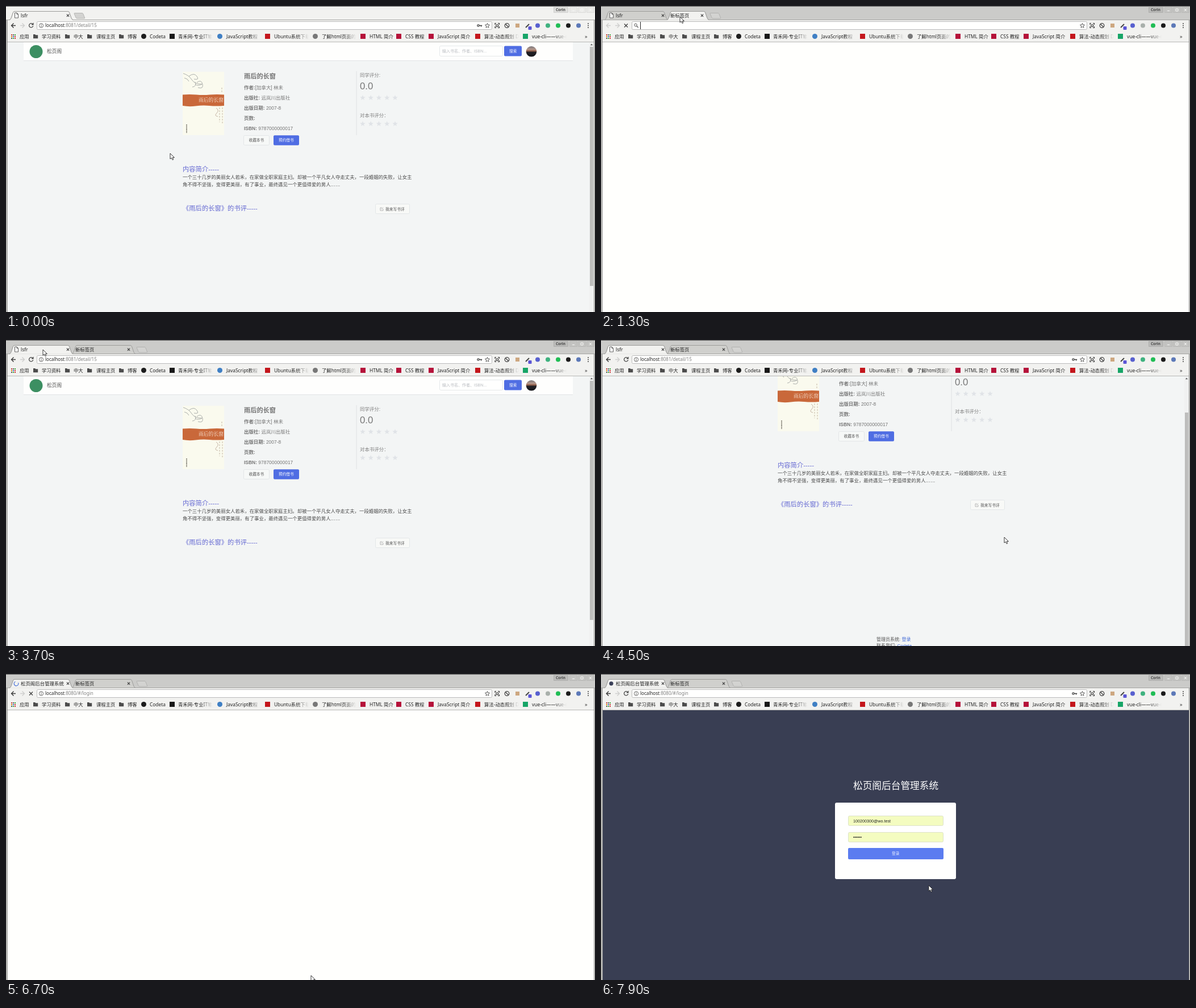
Recreate the animation shown at these times as an HTML page. Size 1037x540 px, loop 8000 ms.

```html
<!DOCTYPE html>
<html lang="zh-CN">
<head>
<meta charset="utf-8">
<title>Library demo</title>
<style>
html, body { margin: 0; width: 100%; height: 100%; overflow: hidden; background: #f2f2f0; }
svg { display: block; width: 1037px; height: 540px; }
text { font-family: 'Noto Sans', 'Noto Sans CJK SC', 'Noto Sans CJK', sans-serif; white-space: pre; }
.page text { font-family: 'Liberation Sans', 'Noto Sans CJK SC', 'Noto Sans CJK', sans-serif; }
.page .serif { font-family: 'Noto Serif', 'Noto Serif CJK SC', 'Noto Sans CJK SC', serif; }
.line { fill: none; stroke: #3c3c3c; stroke-width: 1.2; }
</style>
</head>
<body>
<svg id="stage" viewBox="0 0 1037 540" xmlns="http://www.w3.org/2000/svg"></svg>
<script>
const BAR = '#f2f2f0';
const BLUE = '#4f6de3';

const text = (x, y, s, size = 8.4, fill = '#222', extra = '') =>
  `<text x="${x}" y="${y}" font-size="${size}" fill="${fill}" ${extra}>${s}</text>`;
const rect = (x, y, w, h, fill, extra = '') =>
  `<rect x="${x}" y="${y}" width="${w}" height="${h}" fill="${fill}" ${extra}/>`;
const disc = (x, y, r, fill, extra = '') =>
  `<circle cx="${x}" cy="${y}" r="${r}" fill="${fill}" ${extra}/>`;
const path = (d, extra = 'class="line"') => `<path d="${d}" ${extra}/>`;
const group = (id, body, extra = '') => `<g id="${id}" ${extra}>${body}</g>`;
const box = (x, y, w, h, fill, edge) =>
  rect(x + .5, y + .5, w - 1, h - 1, fill, `rx="2" stroke="${edge}" stroke-width=".8"`);

const tabShape = (left, right) =>
  `M${left} 24.5Q${left + 2} 24 ${left + 3} 21.5L${left + 6.5} 11.5Q${left + 7.3} 9.5 ${left + 9} 9.5` +
  `H${right - 9}Q${right - 7.3} 9.5 ${right - 6.5} 11.5L${right - 3} 21.5Q${right - 2} 24 ${right} 24.5`;
const cross = (x, y, r) => `M${x - r} ${y - r}l${2 * r} ${2 * r}m0 ${-2 * r}l${-2 * r} ${2 * r}`;

function star(cx, cy, r, inner = .42) {
  let pts = '';
  for (let i = 0; i < 10; i++) {
    const a = i * Math.PI / 5, k = i % 2 ? r * inner : r;
    pts += `${(cx + k * Math.sin(a)).toFixed(2)},${(cy - k * Math.cos(a)).toFixed(2)} `;
  }
  return pts;
}
const starRow = y => [0, 1, 2, 3, 4].map(i =>
  `<polygon points="${star(628 + i * 14.25, y, 5)}" fill="#e0e3e7"/>`).join('');

// Bookmark: kind of icon, icon left edge, label left edge, label, optional fade end
const folder = x => path(`M${x} 50h3.2l1 1.2h4v6h-8.2z`, 'fill="#4c4c4c"');
const square = fill => x => rect(x, 49, 9, 9, fill);
const round = fill => x => disc(x + 4.5, 53.5, 4.5, fill);
const bookmarks = [
  [folder, 48, 63, '学习资料'], [folder, 104, 119, '中大'],
  [folder, 143, 159, '课程主页'], [folder, 199, 214, '博客'],
  [round('#1c1c1c'), 238, 253, 'Codeta'],
  [square('#181818'), 288, 303, '青禾网-专业IT笔', 364],
  [round('#3f7fc4'), 372, 388, 'JavaScript教程', 449],
  [square('#c4161c'), 456, 472, 'Ubuntu系统下载', 533],
  [round('#777'), 540, 556, '了解html页面的', 617],
  [square('#b5123a'), 624, 640, 'HTML 简介'],
  [square('#b5123a'), 687, 703, 'CSS 教程'],
  [square('#b5123a'), 744, 760, 'JavaScript 简介'],
  [square('#c4161c'), 826, 842, '算法-动态规划 D', 903],
  [square('#17a567'), 910, 926, 'vue-cli——vue-r', 987]
];
const bookmark = ([icon, ix, tx, label, end]) =>
  icon(ix) + text(tx, 56.7, label) +
  (end ? rect(end - 22, 47, 22, 14, 'url(#fade)') + rect(end, 47, 7, 14, BAR) : '');

function appsGrid() {
  const tones = ['#c33', '#555', '#3a3', '#d80', '#36c', '#c33', '#555', '#3a3', '#c33'];
  return tones.map((c, i) => rect(9 + i % 3 * 3, 50 + (i / 3 | 0) * 3, 2, 2, c)).join('');
}

const defs = `<defs>
  <linearGradient id="fade"><stop stop-color="${BAR}" stop-opacity="0"/><stop offset="1" stop-color="${BAR}"/></linearGradient>
  <linearGradient id="dusk" x2="0" y2="1"><stop stop-color="#77757a"/><stop offset=".3" stop-color="#b5988c"/>
    <stop offset=".46" stop-color="#8f5c48"/><stop offset=".56" stop-color="#222126"/><stop offset="1" stop-color="#15161b"/></linearGradient>
  <clipPath id="view"><rect x="3" y="64" width="1032" height="476"/></clipPath>
  <clipPath id="label"><rect id="labelClip" x="119" y="8" width="90" height="16"/></clipPath>
</defs>`;

const cover = rect(311, 116, 73, 112, '#fafaee') +
  path('M312 119q10 3 15 11t18 8q-8 4-12 0M322 124q9-7 14 0t-5 5M333 134q3 8-5 9M336 135q8-6 10 3t-8 6M314 127q6 1 8 6',
    'fill="none" stroke="#a3a6a4" stroke-width=".9"') +
  path('M380 144v10M376 179v26M381 179v28', 'stroke="#c6b9a6" stroke-dasharray="3 2"') +
  path('M370 180q6 4 1 9t2 6', 'fill="none" stroke="#b8a392" stroke-width=".8"') +
  path('M311 156.5q12-1 24 0t24 0 25 0v19.5q-14 1-26 0t-24 .5-23-.5z', 'fill="#c9683a"') +
  text(339, 168.5, '雨后的长窗', 8.8, '#fbf0e4', 'class="serif"') +
  path('M318 209v15', 'stroke="#77746a" stroke-width="1.6" stroke-dasharray="2 .7"');

const fact = (y, label, value = '') =>
  text(419, y, `<tspan font-weight="700">${label}</tspan>${value}`, 8.45, '#777');

const bookPage = rect(3, 64, 1032, 700, '#f3f5f5') +
  rect(31, 64, 967, 32, '#fefefd') + rect(31, 96, 967, 1, '#e2e4e5') +
  disc(53, 80.5, 11.5, '#3c8f62') + text(72, 83, '松页阁', 8.7, '#555') +
  box(763, 70, 112, 19, '#fffffe', '#dfe2e6') + text(768, 82, '输入书名、作者、ISBN...', 7, '#b8bbc0') +
  rect(877, 70.5, 31, 18, BLUE, 'rx="2"') + text(886, 82, '搜索', 6.8, '#fff') +
  disc(925, 80.3, 9.3, 'url(#dusk)') + cover +
  text(419, 128, '雨后的长窗', 11.2, '#777', 'font-weight="600"') +
  fact(147.4, '作者:', '[加拿大] 林未') + fact(165.4, '出版社:', ' 远岚川出版社') +
  fact(183.4, '出版日期:', ' 2007-8') + fact(201.4, '页数:') + fact(219.4, 'ISBN:', ' 9787000000017') +
  box(418, 228, 46, 18, '#f6f8f7', '#dfe2e5') + text(427.5, 239.4, '收藏本书', 6.7, '#555') +
  rect(471, 228.3, 45, 17.4, BLUE, 'rx="2"') + text(480, 239.4, '预约借书', 6.7, '#fff') +
  rect(616.5, 115, 1, 113, '#e0e2e3') +
  text(623, 125, '同学评分:', 8.45, '#808080') + text(623, 147, '0.0', 16.8, '#777') + starRow(162) +
  text(623, 196.3, '对本书评分：', 8.45, '#808080') + starRow(208) +
  text(311, 291.6, '内容简介-----', 11.3, '#6468d2') +
  text(311, 305.3, '一个三十几岁的美丽女人若禾，在家做全职家庭主妇。却被一个平凡女人夺走丈夫，一段婚姻的失败，让女主', 8.42, '#4a4a4a') +
  text(311, 317.7, '角不得不坚强，变得更美丽，有了事业，最终遇见一个更值得爱的男人……', 8.42, '#4a4a4a') +
  text(311, 361.2, '《雨后的长窗》的书评-----', 11.3, '#6468d2') +
  box(650, 349, 61, 18, '#f8f9f7', '#dfe2e5') + text(668, 360.6, '我来写书评', 6.75, '#555') +
  path('M662 356h-3v5h5v-3M661 359l3-3.5', 'fill="none" stroke="#999" stroke-width=".7"') +
  text(485, 597.6, '管理员系统: <tspan fill="#4169d6">登录</tspan>', 8, '#555') +
  text(485, 609.3, '联系我们: <tspan fill="#4169d6">Codeta</tspan>', 8, '#555');

const scrollbar = rect(1027, 64, 8, 476, '#f0f1f1') +
  path('M1028.8 69.3h4.4l-2.2-2.6z', 'fill="#555"') +
  rect(1028, 72, 6, 422, '#bdbdbc', 'id="thumb"');

const login = rect(3, 64, 1032, 476, '#393e53') +
  text(444, 202.6, '松页阁后台管理系统', 16.7, '#fff') +
  rect(412, 227, 213, 135, '#fffffe', 'rx="3"') +
  group('empty', box(435, 250, 168, 18, '#fff', '#dcdfe4') + box(435, 279, 168, 18, '#fff', '#dcdfe4') +
    text(444, 261.6, 'username', 7.2, '#b9bcc2') + text(444, 290.2, 'password', 7.2, '#b9bcc2')) +
  group('filled', box(435, 250, 168, 18, '#f4fcc0', '#d6dcc4') + box(435, 279, 168, 18, '#f4fcc0', '#d6dcc4') +
    text(444, 261.6, '100200300@wo.test', 7.2, '#222') + text(444, 290.2, '••••••', 7.2, '#222')) +
  rect(435, 307, 168, 20, '#5b7cf0', 'rx="2"') + text(512, 319.3, '登录', 6.7, '#eef2ff');

const newTabPage = text(959, 83, '邮件', 8, '#555') + text(984, 83, '图片', 8, '#555') +
  [0, 1, 2, 3, 4, 5, 6, 7, 8].map(i => rect(1013 + i % 3 * 3, 76 + (i / 3 | 0) * 3, 2, 2, '#777')).join('');

const arrow = 'M0 0V10L2.4 8 4.1 11.6 5.8 10.8 4.2 7.4H7.4Z';
const hand = 'M2.3 6.5V1.2Q3.2 0 4.1 1.2V4.2L8.4 5Q9.8 5.3 9.5 7L8.7 11.5H3.4L.4 7.7Q.3 6.3 2.3 7.5Z';

const strip = rect(0, 0, 1037, 25, BAR, 'id="strip"') +
  rect(964.5, 2.5, 25, 9, '#000', 'fill-opacity=".08" stroke="#000" stroke-opacity=".18" stroke-width=".6"') +
  text(968, 9.4, 'Corin', 6.3, '#444', 'font-weight="700"') +
  path('M992.5 2.5h13v9h-13zM1007.5 2.5h13v9h-13zM1022.5 2.5h13v9h-13z',
    'fill="#000" fill-opacity=".04" stroke="#000" stroke-opacity=".12" stroke-width=".6"') +
  path('M997 8.5h4M1012 5h4v4h-4z' + cross(1029, 7, 2), 'fill="none" stroke="#f8f8f6"') +
  path('M1.5 12.5h13.5q1.2 0 1.7 1l3 7.5q.3 1-1 1h-12.5q-1.4 0-2-1.2l-3-7q-.4-1.3.3-1.3z',
    'id="plus" fill="#d3d3d1" stroke="#ababa9" stroke-width=".8"');

const tabs = path('', 'id="tabB" stroke="#9c9c9a"') +
  path(tabShape(6, 118), 'id="tabA" stroke="#9c9c9a"') +
  path('', 'id="tabFront" fill="#f2f2f0" stroke="#9c9c9a"') +
  path('', 'id="baseline" fill="none" stroke="#a4a4a2"') +
  group('fileIcon', path('M15.5 12h3.5l2.5 2.5v6.5h-6zM19 12v2.5h2.5', 'fill="#fafafa" stroke="#555" stroke-width=".9"')) +
  group('spinner', path('M18 13.2a3.8 3.8 0 1 0 3.8 3.8', 'fill="none" stroke="#4a72d8" stroke-width="1.3"')) +
  group('siteIcon', disc(18, 16.8, 3.6, '#3a3f58')) +
  text(26, 19.7, '', 8.45, '#222', 'id="title"') + path(cross(109, 16.7, 2.1)) +
  group('tabBText', `<g clip-path="url(#label)">${text(122, 19.7, '新标签页')}</g>` +
    path(cross(0, 16.7, 2.1), 'id="tabBClose" class="line"'));

const toolbar = rect(0, 25, 1037, 38, BAR) + rect(0, 63, 1037, 1, '#b8b8b6') +
  path('M17 34.5h-7.5m4-4l-4 4 4 4', 'id="back" fill="none" stroke-width="1.4"') +
  path('M25 34.5h7.5m-4-4l4 4-4 4', 'fill="none" stroke="#cfcfcd" stroke-width="1.4"') +
  path('M47 32a3.6 3.6 0 1 0 .7 3.2M48 29.8v3h-3', 'id="reload" class="line"') +
  path(cross(44, 34.5, 3), 'id="stop" class="line"') +
  rect(54.5, 27.5, 801, 14, '#fffffe', 'rx="2" stroke="#bababa"') +
  group('info', disc(62, 34.5, 3.6, 'none', 'stroke="#555" stroke-width=".9"') + path('M62 34v2.6M62 32v1', 'stroke="#555"')) +
  group('lens', disc(61, 33.5, 2.3, 'none', 'stroke="#555"') + path('M62.8 35.3l2.8 2.8', 'stroke="#555" stroke-width="1.3"')) +
  `<text x="69" y="37.4" font-size="8.05" fill="#222" id="host">localhost<tspan id="url" fill="#808080"></tspan></text>` +
  rect(69, 28, 1, 13, '#222', 'id="caret"') +
  group('key', disc(831.5, 34.5, 1.7, 'none', 'stroke="#444" stroke-width="1.3"') + path('M833.2 34.5h5M836.6 34.5v2', 'stroke="#444" stroke-width="1.3"')) +
  `<polygon points="${star(847.5, 34.7, 4.2, .48)}" fill="none" stroke="#444" stroke-width=".9"/>` +
  path('M861 33v-2.5h2M866 30.5h2.5v2.5M868.5 36v2.5h-2.5M863 38.5h-2v-2.5M863 33h3.5v3.5h-3.5z') +
  disc(882, 34.5, 3.8, 'none', 'stroke="#444" stroke-width="1.3"') + path('M879.5 32l5 5') +
  rect(897, 31, 7, 7, '#cda780') +
  path('M915 38l6-6', 'stroke="#444" stroke-width="2"') + rect(919.5, 36, 6, 6, '#5b55d6', 'rx="1"') +
  disc(936, 34.5, 4, '#5860cf') + disc(954, 34.5, 4, '#3fb27f', 'id="devIcon"') +
  disc(972, 34.5, 4, '#20bd55') + disc(990, 34.5, 4, '#1b1b1b') + disc(1008, 34.5, 4, '#5d79b8') +
  [31, 34.5, 38].map(y => disc(1025, y, 1, '#444')).join('') +
  appsGrid() + text(24, 56.7, '应用') + bookmarks.map(bookmark).join('') + text(1019, 56.5, '»', 9, '#333');

const stage = document.getElementById('stage');
stage.innerHTML = defs + rect(0, 0, 1037, 540, '#fffffd') +
  `<g class="page" clip-path="url(#view)">` + group('book', group('scroll', bookPage) + scrollbar) +
  group('login', login) + group('newTab', newTabPage) + '</g>' +
  strip + tabs + toolbar +
  rect(0, 0, 1037, 1, '#555') + rect(0, 25, 1, 515, '#d6d6d4') + rect(1, 25, 1.5, 515, '#8b8b89') +
  rect(1035, 25, 1, 515, '#8b8b89') + rect(1036, 25, 1, 515, '#d6d6d4') +
  path(arrow, 'id="cursor" fill="#fff" stroke="#222" stroke-width=".9" stroke-linejoin="round"');

const el = {};
stage.querySelectorAll('[id]').forEach(n => el[n.id] = n);
const show = (id, on) => el[id].style.display = on ? '' : 'none';
const set = (id, name, value) => el[id].setAttribute(name, value);

// Pointer stops: time, x, y
const stops = [
  [0, 289, 260], [400, 248, 203], [600, 222, 146], [700, 194, 92], [800, 165, 50], [900, 142, 25], [1000, 130, 16],
  [1200, 139, 19], [2200, 122, 17], [2300, 96, 13], [2400, 76, 10], [2500, 65, 9], [2700, 64, 8], [2900, 65, 17],
  [3800, 190, 110], [3900, 412, 256], [4100, 562, 340], [4300, 690, 350], [4400, 710, 348],
  [4600, 714, 353], [4700, 718, 359], [4900, 708, 371], [5500, 519, 521], [5700, 524, 524],
  [5800, 529, 527], [5900, 533, 530], [6000, 535, 532], [6400, 537, 532], [6800, 535, 532], [7400, 537, 532],
  [7600, 553, 500], [7700, 576, 440], [7800, 586, 395], [7900, 577, 373]
];
const tabEnds = [[0, 118], [1200, 146], [1300, 190], [1400, 216], [1500, 228]];
const scrolls = [[0, 0], [4300, 22], [4400, 51], [4500, 67]];
const at = (list, t) => list.filter(s => s[0] <= t).pop();
const within = (t, a, b) => t >= a && t < b;

function draw(t) {
  const fresh = within(t, 1200, 3700);
  const blank = within(t, 6400, 6800);
  const admin = t >= 6400;
  const loading = within(t, 1200, 1600) || within(t, 6200, 6800);
  const spin = within(t, 6200, 6800);
  const right = at(tabEnds, t)[1];
  const opened = t >= 1200;

  show('book', !fresh && !admin);
  show('login', t >= 6800);
  show('newTab', fresh && t >= 2000);
  el.newTab.style.opacity = Math.min(1, .3 + Math.max(0, Math.floor((t - 2000) / 100)) * .14);
  show('empty', t < 7000);
  show('filled', t >= 7000);

  const y = at(scrolls, t)[1];
  set('scroll', 'transform', `translate(0 ${-y})`);
  set('thumb', 'y', 72 + y * .836);

  set('strip', 'fill', opened ? '#cbcbc9' : BAR);
  show('tabB', opened);
  show('tabBText', opened);
  const shapeB = tabShape(116, right);
  set('tabB', 'd', shapeB);
  set('tabB', 'fill', '#d0d0cd');
  set('tabA', 'fill', fresh ? '#d0d0cd' : BAR);
  set('tabFront', 'd', fresh ? shapeB : tabShape(6, 118));
  set('baseline', 'd', fresh ? `M0 24.5H116M${right} 24.5H1037` : 'M0 24.5H6M118 24.5H1037');
  set('tabBClose', 'transform', `translate(${right - 12} 0)`);
  set('labelClip', 'width', Math.max(0, right - 138));
  set('plus', 'transform', `translate(${right + 1} 0)`);

  show('fileIcon', t < 6200);
  show('spinner', spin);
  set('spinner', 'transform', `rotate(${Math.floor(t / 100) * 48} 18 17)`);
  show('siteIcon', t >= 6800);
  el.title.textContent = admin ? '松页阁后台管理系统' : 'lsfr';

  set('back', 'stroke', fresh ? '#cfcfcd' : '#3c3c3c');
  show('reload', !loading);
  show('stop', loading);
  show('info', !fresh);
  show('lens', fresh);
  show('host', !fresh);
  el.url.textContent = admin ? ':8080/#/login' : ':8081/detail/15';
  show('caret', within(t, 1200, 1800) || within(t, 2300, 2700) || within(t, 3300, 3700));
  show('key', !fresh && (!admin || t >= 7000));
  set('devIcon', 'fill', fresh || blank ? '#a9b0ab' : '#3fb27f');

  const [, px, py] = at(stops, t);
  const link = within(t, 5800, 6400) || within(t, 6800, 7400);
  show('cursor', !within(t, 5100, 5500));
  set('cursor', 'd', link ? hand : arrow);
  set('cursor', 'transform', `translate(${px} ${py})`);
}

function tick() {
  draw(performance.now() % 8000);
  requestAnimationFrame(tick);
}
tick();
</script>
</body>
</html>
```
